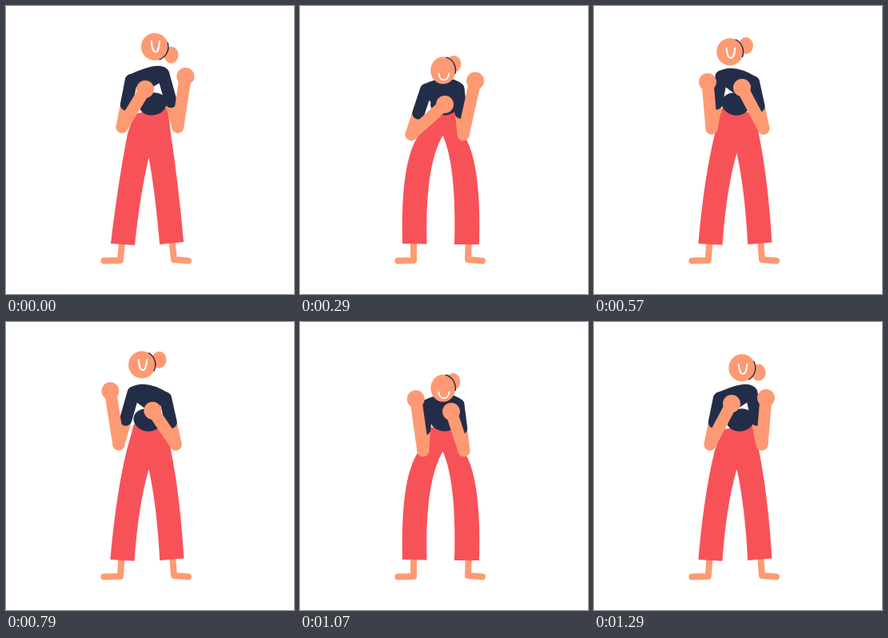
Animation of 360x360 px, one loop 1370 ms. Source, as an HTML page with a canvas:

```html
<!DOCTYPE html>
<html>
<head>
<meta charset="utf-8">
<style>
html, body { margin: 0; width: 100%; height: 100%; overflow: hidden; background: #fff; }
canvas { display: block; }
</style>
</head>
<body>
<canvas id="stage" width="360" height="360"></canvas>
<script>
const ctx = document.getElementById('stage').getContext('2d');
const SKIN = '#fd9a73', RED = '#f85259', NAVY = '#242d48';
const LOOP = 1370, LAST_STEP = 18, STEP = 1000 / 14;
const CYCLE = 20, HALF = CYCLE / 2; // one sway holds two bounces

// Path of one arm: step, hand x, hand y, elbow x. The other arm mirrors it half a cycle later.
const armPath = [
  [0, 174, 104, 145], [2, 174, 118, 144], [4, 181, 123, 139], [5, 168, 112, 152],
  [8, 142, 95, 147], [11.5, 130, 86, 141], [14.5, 141, 95, 154], [18, 172, 102, 145]
];

const wave = (step, peak, period) => Math.cos((step - peak) / period * 2 * Math.PI);
const mix = (a, b, k) => a.map((p, i) => p + (b[i] - p) * k);
const mirror = ([x, y]) => [357 - x, y];

// Smooth curve through the path, closed over one cycle
function armAt(step) {
  const n = armPath.length;
  const key = i => armPath[(i + n) % n];
  const time = i => key(i)[0] + CYCLE * Math.floor(i / n);
  step %= CYCLE;
  let i = n - 1;
  while (armPath[i][0] > step) i--;
  const h = time(i + 1) - time(i), u = (step - time(i)) / h;
  const slope = (k, j) => (key(k + 1)[j] - key(k - 1)[j]) / (time(k + 1) - time(k - 1)) * h;
  const [x, y, elbowX] = [1, 2, 3].map(j =>
    key(i)[j] + (key(i + 1)[j] - key(i)[j]) * u * u * (3 - 2 * u)
    + u * (1 - u) * (slope(i, j) * (1 - u) - slope(i + 1, j) * u));
  return { hand: [x, y], elbowX };
}

function line(color, width, ...pts) {
  ctx.beginPath();
  pts.forEach(p => ctx.lineTo(...p));
  ctx.strokeStyle = color;
  ctx.lineWidth = width;
  ctx.stroke();
}

function oval(color, x, y, rx, ry = rx, turn = 0) {
  ctx.beginPath();
  ctx.ellipse(x, y, rx, ry, turn, 0, 7);
  ctx.fillStyle = color;
  ctx.fill();
}

function drawLegs(crouch, tilt) {
  const at = (up, down) => up + (down - up) * crouch;
  line(SKIN, 8, [at(145.5, 142), 290], [at(143, 142), 318], [122.5, 318.5]);
  line(SKIN, 8, [at(207, 211), 290], [at(210, 210), 317], [228, 318.5]);
  ctx.beginPath();
  ctx.moveTo(160, 131 - tilt / 2);
  ctx.lineTo(at(152, 146), at(160, 165));
  ctx.quadraticCurveTo(at(140.5, 125), at(221, 199), at(131, 128), 297);
  ctx.lineTo(at(161, 158.5), at(299, 297.5));
  ctx.quadraticCurveTo(at(168, 155.5), at(236, 200), 178.5, at(190, 161));
  ctx.quadraticCurveTo(at(186.5, 196), at(236, 200), at(192, 193), 298);
  ctx.lineTo(at(222, 224), at(295, 298));
  ctx.quadraticCurveTo(at(215, 227), at(221, 199), at(206, 207), at(160, 165));
  ctx.lineTo(202, 131 + tilt / 2);
  ctx.fillStyle = RED;
  ctx.fill();
}

function drawBody(step, sway) {
  const crouch = (1 + wave(step, 4.5, HALF)) / 2;
  const tilt = -8 * sway;
  const mid = [178 - 1.5 * sway, 88.5 + 16 * crouch];
  const arms = [-1, 1].map(side => {
    const { hand, elbowX } = armAt(side < 0 ? step : step + HALF);
    const place = p => side < 0 ? p : mirror(p);
    const shoulder = [mid[0] + side * 20, mid[1] + side * tilt / 2];
    const elbow = place([elbowX, 151 + 10 * crouch]);
    return { shoulder, elbow, hand: place(hand), cuff: mix(shoulder, elbow, 0.52) };
  });
  drawLegs(crouch, tilt);

  for (const { cuff, elbow } of arms) line(SKIN, 15, cuff, elbow);
  oval(NAVY, 180 - tilt * 0.45, 122.5, 17.5, 14, tilt * 0.03);

  const [left, right] = arms.map(a => a.shoulder);
  ctx.beginPath();
  ctx.moveTo(...left);
  ctx.quadraticCurveTo(mid[0] + 5 - tilt * 1.4, mid[1] - 12, ...right);
  ctx.lineTo(177, mid[1] + 7 + 11 * crouch);
  ctx.closePath();
  ctx.fillStyle = ctx.strokeStyle = NAVY;
  ctx.lineWidth = 15;
  ctx.fill();
  ctx.stroke();

  for (const { shoulder, cuff } of arms) line(NAVY, 15.5, shoulder, cuff);
  for (const { hand, elbow } of arms) {
    line(SKIN, 15, hand, elbow);
    oval(SKIN, ...hand, 11);
  }
}

function drawHead(step, sway) {
  const nod = ((1 + wave(step, 4.8, HALF)) / 2) ** 1.3;
  const x = 177.5 + 8.5 * sway, y = 51 + 32 * nod;
  const turn = 0.1 + 0.36 * sway - 0.75 * nod;
  const reach = 23 - 8 * nod, rx = 17 - 1.5 * nod;
  oval(SKIN, x + reach * Math.cos(turn), y + reach * Math.sin(turn), 9, 10.5);
  oval(SKIN, x, y, rx, 17);
  ctx.beginPath();
  ctx.ellipse(x, y, rx, 17, 0, turn - 0.75, turn + 0.75);
  ctx.strokeStyle = NAVY;
  ctx.lineWidth = 1.4;
  ctx.stroke();

  const cx = x + 1, w = 5 + 1.5 * nod, top = y - 7 + 12 * nod;
  const dip = top + 18 - 8 * nod;
  ctx.beginPath();
  ctx.moveTo(cx - w, top);
  ctx.bezierCurveTo(cx + 1 - w, dip, cx - 1 + w, dip, cx + w, top);
  ctx.strokeStyle = '#fff';
  ctx.lineWidth = 2;
  ctx.stroke();
}

function frame() {
  const t = Math.floor(performance.now() % LOOP / 10) * 10;
  const step = Math.min(LAST_STEP, Math.floor((t + 4.99) / STEP));
  const sway = wave(step, -0.5, CYCLE);
  ctx.fillStyle = '#fff';
  ctx.fillRect(0, 0, 360, 360);
  ctx.lineCap = ctx.lineJoin = 'round';
  drawBody(step, sway);
  drawHead(step, sway);
  requestAnimationFrame(frame);
}
frame();
</script>
</body>
</html>
```
